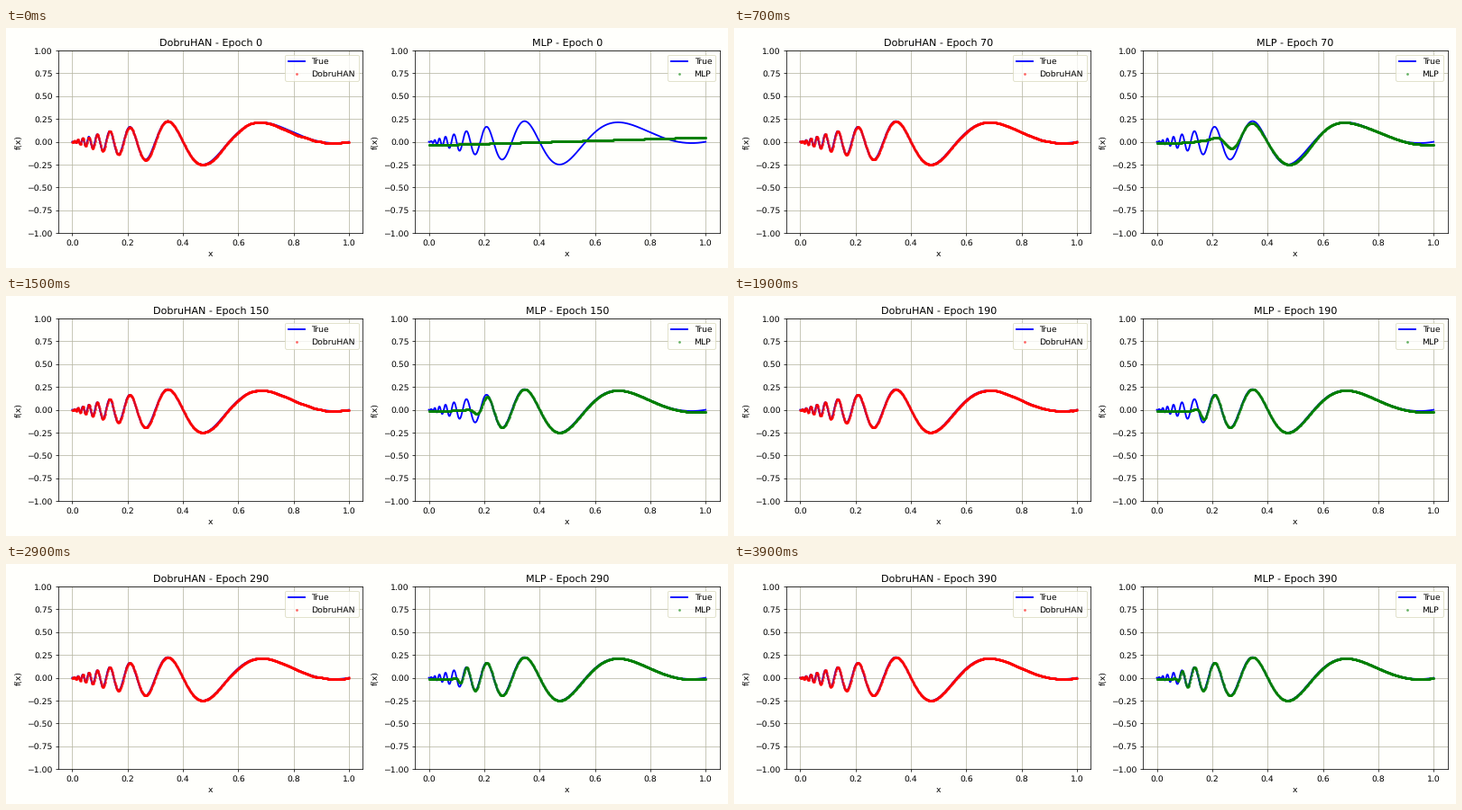
Write a matplotlib script that moves like this. It is 800 by 267 pixels and loops after 4000 ms.

```python
import numpy as np
import matplotlib.pyplot as plt
from matplotlib.animation import FuncAnimation

W, H, DPI = 800, 267, 200 / 3
FRAMES, INTERVAL = 40, 100
PAPER, GRID, FRAME = "#fffffc", "#b6b6a2", "#d8d8bc"

plt.rcParams.update({"font.family": "DejaVu Sans", "text.hinting": "none"})
x = np.linspace(0, 1, 1000)


def chirp(t):
    return t * (1 - t) * np.sin(2 * np.pi / (t + 0.1))


def bump(center, width):
    return np.exp(-((x - center) / width) ** 2)


def poly_fit(epoch):
    """Near-perfect fit with a small, shrinking Chebyshev ripple."""
    rng = np.random.default_rng(epoch + 5)
    theta = np.arccos(2 * x - 1)
    size = 0.001 + 0.0015 * np.exp(-epoch / 60)
    ripple = sum(rng.normal(0, size) * np.cos(k * theta)
                 for k in range(3, 40, 9))
    return chirp(x) + ripple - 0.014 * np.exp(-epoch / 4) * bump(0.8, 0.08)


def mlp_fit(epoch):
    """The fit spreads from the slow waves on the right to the fast ones."""
    front = 0.31 * np.exp(-epoch / 283) + 1.08 * np.exp(-epoch / 20)
    width = 0.003 + 0.33 * front ** 2
    share = 1 / (1 + np.exp(-np.clip((x - front) / width, -50, 50)))
    gain = 1 - np.exp(-(epoch / 20) ** 2)

    # early fits are out of step, lead in with a hump and sag at the right end
    warp = -0.06 * np.exp(-(epoch / 48) ** 2) * np.cos(2 * np.pi * (x - 0.5) / 0.36)
    hump = 0.045 * np.exp(-(epoch / 130) ** 4) * bump(0.75 * front, 0.22 * front)
    sag = 0.035 * np.exp(-(epoch / 250) ** 2) * x ** 16

    curve = chirp(x + warp) * share - 0.01 * (1 - share) + hump - sag
    return gain * curve + (1 - gain) * (0.088 * x - 0.038)


def make_panel(left, name, color):
    ax = fig.add_axes([left / W, 1 - 228.2 / H, 337.3 / W, 203.2 / H],
                      facecolor=PAPER)
    ax.plot(x, chirp(x), color="blue", lw=2, label="True")
    dots = ax.scatter(x, chirp(x), s=9, color=color, alpha=0.6, lw=0,
                      zorder=3, label=name)
    ax.set(xlim=(-0.05, 1.05), ylim=(-1, 1), xlabel="x", ylabel="f(x)")
    ax.set_xticks(np.linspace(0, 1, 6))
    ax.set_yticks(np.linspace(-1, 1, 9))
    ax.grid(color=GRID, lw=0.8)
    ax.legend(loc="upper right", facecolor=PAPER, edgecolor=FRAME,
              scatteryoffsets=[0.4])
    return dots, ax.set_title(name), name


fig = plt.figure(figsize=((W + 0.01) / DPI, (H + 0.01) / DPI), dpi=DPI,
                 facecolor=PAPER)
panels = [(make_panel(58, "DobruHAN", "red"), poly_fit),
          (make_panel(453.2, "MLP", "green"), mlp_fit)]


def update(i):
    epoch = 10 * i
    artists = []
    for (dots, title, name), fit in panels:
        dots.set_offsets(np.column_stack([x, fit(epoch)]))
        title.set_text(f"{name} - Epoch {epoch}")
        artists += [dots, title]
    return artists


anim = FuncAnimation(fig, update, frames=FRAMES, interval=INTERVAL,
                     repeat=True, repeat_delay=0, blit=False)
plt.show()
```
